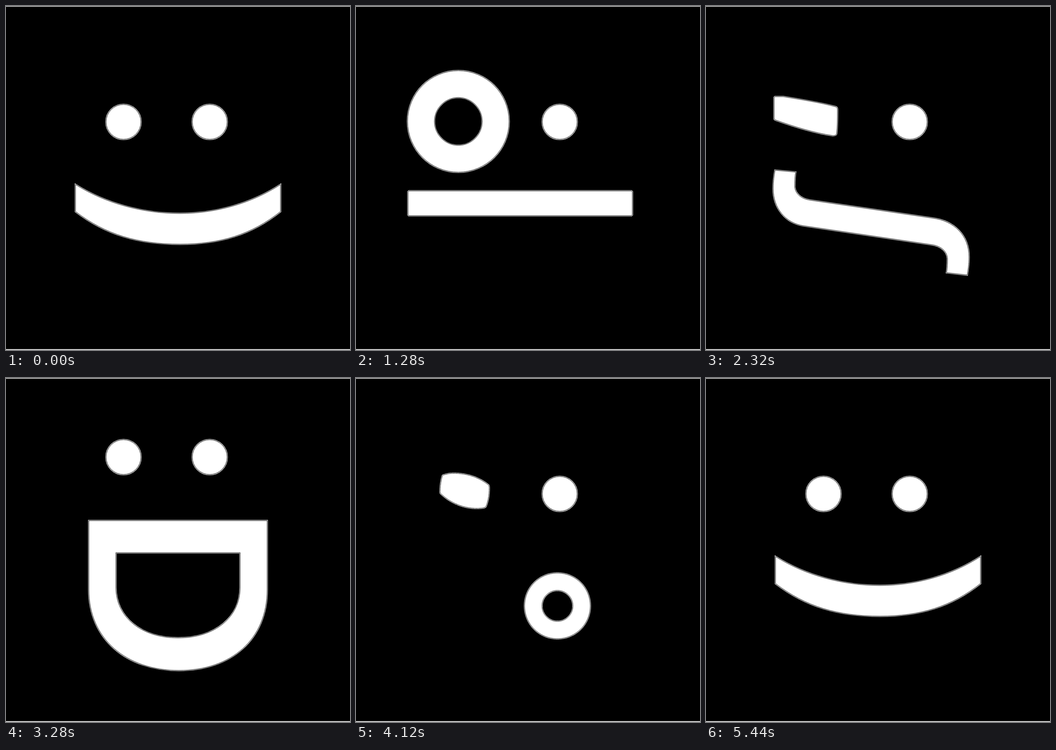
An HTML page with a canvas that plays this animation: 748x748 px, repeating every 5.64 s.

```html
<!DOCTYPE html>
<html lang="en">
<head>
<meta charset="utf-8">
<title>Faces</title>
<style>
html, body { margin: 0; width: 100%; height: 100%; overflow: hidden; background: #000; }
canvas { display: block; width: 748px; height: 748px; }
</style>
</head>
<body>
<canvas id="stage" width="748" height="748"></canvas>
<script>
const ctx = document.getElementById('stage').getContext('2d');
const LOOP = 5640, STEP = 40, SAMPLES = 260;

// A contour keeps its exact path for rests and even samples for morphs.
function contour(d, matrix = new DOMMatrix()) {
  const el = document.createElementNS('http://www.w3.org/2000/svg', 'path');
  el.setAttribute('d', d);
  const length = el.getTotalLength();
  const points = Array.from({ length: SAMPLES }, (_, i) =>
    matrix.transformPoint(el.getPointAtLength(length * i / SAMPLES)));
  const path = new Path2D();
  path.addPath(new Path2D(d), matrix);
  return { path, points };
}

const shape = (outer, hole, matrix) => ({
  outer: contour(outer, matrix),
  hole: hole ? contour(hole, matrix) : null
});

// Circle starting at its upper left, clockwise.
function circle(x, y, r) {
  const k = r * Math.SQRT1_2;
  return `M${x - k} ${y - k}A${r} ${r} 0 0 1 ${x + k} ${y + k}A${r} ${r} 0 0 1 ${x - k} ${y - k}Z`;
}

const ring = (x, y, r) => shape(circle(x, y, r), circle(x, y, r * 0.47));

const around = (x, y, scale, turn = 0, dx = 0, dy = 0) =>
  new DOMMatrix().translate(x + dx, y + dy).rotate(turn).scale(scale).translate(-x, -y);

// Curved band between two vertical ends, lowest at LOW.
const LOW = 378;
function sagTo(from, to, y, sag, drop, reach) {
  const low = y + sag, shoulder = y + sag * drop;
  const a = LOW - from, b = to - LOW;
  return `C${from + a * 0.29} ${shoulder} ${LOW - a * reach} ${low} ${LOW} ${low}` +
    `C${LOW + b * reach} ${low} ${to - b * 0.29} ${shoulder} ${to} ${y}`;
}

function band(left, right, top, bottom, sagTop, sagBottom) {
  return shape(`M${left} ${top}${sagTo(left, right, top, sagTop, 0.66, 0.35)}` +
    `V${bottom}${sagTo(right, left, bottom, sagBottom, 0.71, 0.4)}Z`);
}

function slab(x0, y0, x1, y1) {
  return shape(`M${x0 + 2} ${y0}H${x1 - 2}L${x1} ${y0 + 2}V${y1 - 2}L${x1 - 2} ${y1}H${x0 + 2}L${x0} ${y1 - 2}V${y0 + 2}Z`);
}

const WAVE = 'M150 357L195 361C193 372 193 384 193 394C195 408 206 419 226 422L492 461' +
  'C540 467 572 499 572 546C572 562 570 574 568 585L523 580C525 568 525 558 525 549' +
  'C524 535 513 522 490 519L212 478C173 472 146 440 146 397C146 380 148 368 150 357Z';
const GRIN = 'M180 310H568V460C568 568 490 636 376 636C262 636 180 568 180 460Z';
const GRIN_HOLE = 'M239 380H509V455C509 520 455 565 374 565C294 565 239 520 239 455Z';
const BRACE = 'M222 444H300C335 444 350 430 351 400H412C412 425 425 444 455 444H530' +
  'C590 444 618 485 618 540V576H569V548C569 520 553 507 520 507H437C405 507 386 485 385 455' +
  'H377C375 485 355 507 320 507H232C200 507 184 522 183 548V576H134V540C136 480 165 444 222 444Z';
const HALF_WINK = 'M150 197H168C205 203 250 210 282 219Q286 220 286 226C286 245 286 262 284 278' +
  'Q283 282 276 282C235 276 190 262 151 248Q148 247 148 244V199Z';

const smile = band(151, 597, 388, 447, 63, 71);
const sag = band(151, 597, 400, 460, 110, 122);
const deepSmile = band(163, 579, 405, 468, 130, 154);
const lowSmile = band(151, 597, 394, 456, 77, 86);
const flat = slab(113, 402, 601, 456);
const flatRest = slab(134, 403, 580, 456);
const wave = shape(WAVE);
const waveRest = shape(WAVE, null, around(359, 471, 0.975, 1.5, 8, -2));
const grin = shape(GRIN, GRIN_HOLE);
const bigGrin = shape(GRIN, GRIN_HOLE, around(374, 440, 1.05, 0, -2, 10));
const brace = shape(BRACE);
const smallO = ring(438, 474, 52);
const bigO = ring(438, 517, 91);

const mouthKeys = [
  [0, smile], [880, smile], [1000, sag], [1200, flat], [1280, flat], [1440, flatRest],
  [1560, flatRest], [1920, wave], [2320, wave], [2400, waveRest], [2760, waveRest],
  [2960, bigGrin], [3120, grin], [3360, grin], [3600, brace], [3720, brace],
  [3920, smallO], [4000, smallO], [4240, bigO], [4520, bigO], [4680, smallO], [4720, smallO],
  [5000, deepSmile], [5240, lowSmile], [5400, smile], [LOOP, smile]
];

const dot = shape(circle(255.5, 252, 38));
const rightDot = contour(circle(443, 252, 38));
const wink = shape('M114 183Q200 199 284 219Q287 220 287 224L285 280Q285 284 280 283Q200 259 114 231L112 229V185Z');
const halfWink = shape(HALF_WINK);
const wideEye = ring(220, 252, 104);

const eyeKeys = [
  [0, dot], [200, wink], [560, wink], [640, halfWink], [720, dot], [880, dot],
  [1120, ring(222, 251, 117)], [1280, ring(222.5, 251, 110.5)], [1440, wideEye],
  [1560, wideEye], [1840, dot], [2120, dot], [2240, wink], [2320, halfWink],
  [2400, dot], [3720, dot], [3880, wink], [4000, wink], [4080, halfWink], [4160, dot], [LOOP, dot]
];

const hopKeys = [
  [0, 0], [2760, 0], [2920, -115], [3080, -80], [3280, -80], [3360, -30], [3440, 0],
  [4360, 0], [4480, -37], [4560, -37], [4680, 0], [4720, 0], [4920, -37],
  [5160, -16], [5320, 0], [LOOP, 0]
];

function span(keys, t) {
  let i = 0;
  while (i < keys.length - 2 && keys[i + 1][0] <= t) i++;
  const [t0, from] = keys[i], [t1, to] = keys[i + 1];
  const k = (t - t0) / (t1 - t0);
  return { from, to, k: k * k * (3 - 2 * k) };
}

const mix = (a, b, k) => a + (b - a) * k;

function centre(c) {
  const sum = c.points.reduce((s, p) => ({ x: s.x + p.x, y: s.y + p.y }), { x: 0, y: 0 });
  const p = { x: sum.x / SAMPLES, y: sum.y / SAMPLES };
  return { points: Array(SAMPLES).fill(p) };
}

function blend(a, b, k) {
  if (a === b || k === 0) return a && a.path;
  a = a || centre(b);
  b = b || centre(a);
  const path = new Path2D();
  a.points.forEach((p, i) => path.lineTo(mix(p.x, b.points[i].x, k), mix(p.y, b.points[i].y, k)));
  path.closePath();
  return path;
}

// Fill, then a pale hairline outside a dark one.
function paint(path, color) {
  if (!path) return;
  ctx.fillStyle = color;
  ctx.fill(path);
  ctx.strokeStyle = '#e0e0e0';
  ctx.lineWidth = 3;
  ctx.stroke(path);
  ctx.strokeStyle = '#222';
  ctx.lineWidth = 1;
  ctx.stroke(path);
}

function paintMorph({ from, to, k }) {
  paint(blend(from.outer, to.outer, k), '#fff');
  paint(blend(from.hole, to.hole, k), '#000');
}

function draw(t) {
  ctx.fillStyle = '#000';
  ctx.fillRect(0, 0, 748, 748);
  ctx.fillStyle = '#d4d4d4';
  ctx.fillRect(0, 0, 748, 1.5);
  ctx.fillRect(0, 746, 748, 2);

  const hop = span(hopKeys, t);
  ctx.save();
  ctx.translate(0, mix(hop.from, hop.to, hop.k));
  paintMorph(span(eyeKeys, t));
  paint(rightDot.path, '#fff');
  ctx.restore();
  paintMorph(span(mouthKeys, t));
}

const start = performance.now();
function tick() {
  const t = (performance.now() - start) % LOOP;
  draw(Math.floor(t / STEP) * STEP);
  requestAnimationFrame(tick);
}
tick();
</script>
</body>
</html>
```
